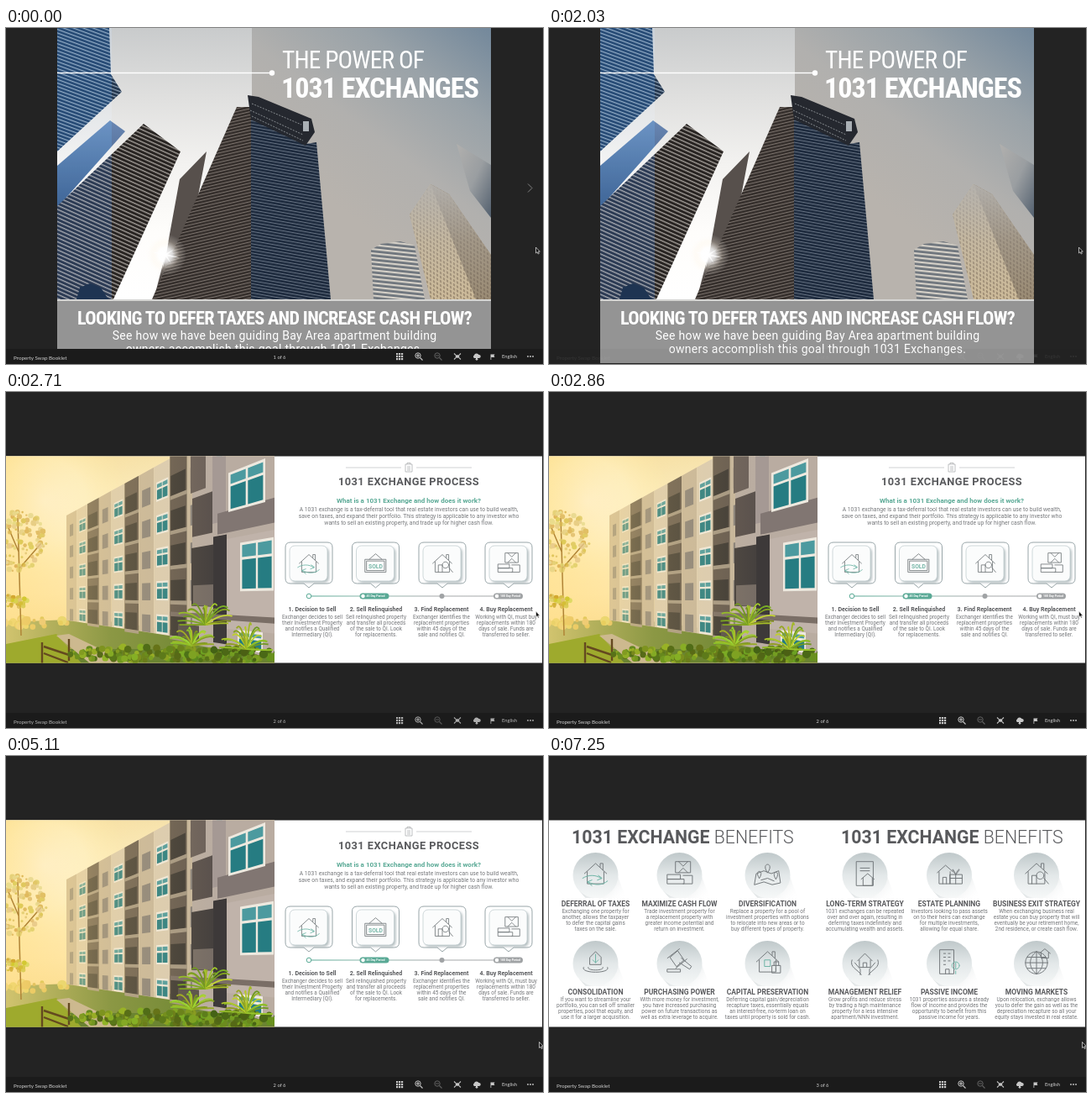
Recreate the animation shown at these times as an HTML page. Size 640 px wide and 400 px high, loop 8 s.

```html
<!DOCTYPE html>
<html lang="en">
<head>
<meta charset="utf-8">
<title>Brochure viewer</title>
<style>
html, body { margin: 0; width: 100%; height: 100%; overflow: hidden; background: #232323; }
svg { display: block; width: 100vw; height: 100vh; }
text { font-family: Roboto, sans-serif; }
.narrow { font-family: "Noto Sans ExtraCondensed", "Roboto Condensed", Roboto, sans-serif; font-stretch: 62.5%; letter-spacing: -.03em; }
.ui text { font-family: Lato, sans-serif; }
.line { fill: none; stroke: #74797c; stroke-width: .9; stroke-linejoin: round; stroke-linecap: round; }
.accent { stroke: #6fb5a6; }
</style>
</head>
<body>
<svg id="stage" viewBox="0 0 640 400"></svg>
<script>
const LOOP = 8000;
const INK = "#58595c", BODY = "#75777a", TEAL = "#59a995";
const stage = document.getElementById("stage");

let seed = 7;
const random = () => (seed = (seed * 16807) % 2147483647) / 2147483647;
const range = n => [...Array(n).keys()];

const text = (x, y, size, fill, content, more = "") =>
  `<text x="${x}" y="${y}" font-size="${size}" fill="${fill}" ${more}>${content}</text>`;
const middle = (x, y, size, fill, content, more = "") =>
  text(x, y, size, fill, content, `text-anchor="middle" ${more}`);
const lines = (x, y, step, size, fill, content) =>
  content.split("|").map((s, i) => middle(x, y + i * step, size, fill, s)).join("");
const rect = (x, y, w, h, fill, more = "") =>
  `<rect x="${x}" y="${y}" width="${w}" height="${h}" fill="${fill}" ${more}/>`;
const poly = (points, fill, more = "") => `<polygon points="${points}" fill="${fill}" ${more}/>`;
const circle = (x, y, r, fill, more = "") => `<circle cx="${x}" cy="${y}" r="${r}" fill="${fill}" ${more}/>`;
const path = (d, more = 'class="line"') => `<path d="${d}" ${more}/>`;
const at = (x, y, content) => `<g transform="translate(${x} ${y})">${content}</g>`;
const BOLD = 'font-weight="700"', LIGHT = 'font-weight="300"';

const stops = colors => colors.map((c, i) =>
  `<stop offset="${i / (colors.length - 1)}" stop-color="${c}"/>`).join("");
const linear = (id, direction, ...colors) =>
  `<linearGradient id="${id}" ${direction}>${stops(colors)}</linearGradient>`;
const vertical = (id, ...colors) => linear(id, 'x2="0" y2="1"', ...colors);
const horizontal = (id, ...colors) => linear(id, "", ...colors);
const radial = (id, ...colors) => `<radialGradient id="${id}">${stops(colors)}</radialGradient>`;
const stripes = (id, dark, light, period, thick, angle) =>
  `<pattern id="${id}" width="${period}" height="${period}" patternUnits="userSpaceOnUse"
    patternTransform="rotate(${angle})">${rect(0, 0, period, period, dark)}
    ${rect(0, 0, period, thick, light)}</pattern>`;

const defs = `<defs>
  ${vertical("sky", "#c9cbcc", "#dfdfde", "#f3f2f0", "#fefdfb", "#fff")}
  ${linear("dimSky", 'x1="1" y1="0" x2=".5" y2=".75"', "#73889b", "#99a2a8", "#b1b0ae", "#b8b3ad")}
  ${radial("sun", "#fff", "#fffc", "#fff5e640", "#fff0")}
  ${stripes("blueGlass", "#21344c", "#93a5b8", 4, 1.2, 20)}
  ${vertical("midGlass", "#6987b3", "#3a5379")}
  ${stripes("slabs", "#272321", "#a09b96", 4.4, 1.4, 24)}
  ${stripes("towerLeft", "#342e2b", "#7d746e", 3.6, 1, -13)}
  ${stripes("towerRight", "#1d2a3d", "#667282", 3.6, 1, 10)}
  ${stripes("roundTower", "#6d747c", "#d6d1c8", 5, 2.2, 6)}
  <pattern id="beige" width="4" height="5" patternUnits="userSpaceOnUse" patternTransform="skewY(30)">
    ${rect(0, 0, 4, 5, "#cdbb9a")}${rect(1, 1, 2, 3, "#98866d")}</pattern>
  ${vertical("mist", "#b3b1aeee", "#b3b1ae50", "#b3b1ae00")}
  ${linear("farTower", 'x2="1" y2="1"', "#b1b0ae", "#9a9ea1", "#525f6e")}
  ${vertical("sunset", "#f5e2ae", "#fff6d6", "#ffeab4", "#f6cf7c")}
  ${radial("glow", "#fff", "#fffae0cc", "#fff0b000")}
  ${horizontal("warmth", "#ffe08ab0", "#ffdd8838", "#ffdd8800")}
  ${vertical("disc", "#bfc8ca", "#e3e8e9", "#f6f8f8")}
  ${linear("shade", 'x2="1" y2="1"', "#bcc3c5", "#dfe3e4", "#ffffff00")}
  ${horizontal("track", TEAL, "#8fb8ad", "#a5a8aa", "#a5a8aa")}
  <clipPath id="cover"><rect x="61" width="517" height="323"/></clipPath>
  <clipPath id="photo"><rect y="76.5" width="320" height="246"/></clipPath>
  <filter id="soft"><feGaussianBlur stdDeviation="1.4"/></filter>
</defs>`;

function coverPage() {
  const rightTower = "481,222 506,186 528,198 578,270 578,323 506,323";
  const skyline = [
    poly("61,0 123,0 125,55 138,76 61,147", "url(#blueGlass)"),
    poly("61,164 124,110 142,123 61,214", "url(#midGlass)"),
    poly("61,212 164,114 208,147 128,323 61,323", "url(#slabs)"),
    poly("84,323 88,309 100,304 113,309 122,323", "#191c20"),
    poly("239,147 207,180 192,262 176,323 210,300", "#57504c"),
    poly("275,94 294,94 294,323 174,323", "url(#towerLeft)"),
    poly("292,94 357,138 370,136 387,323 292,323", "url(#towerRight)"),
    poly("288,80 301,82 364,108 368,124 357,140 292,109", "#25282f"),
    path("M293 90L352 115M291 98L354 127M293 105L354 134", 'stroke="#858a8e" stroke-width="1" fill="none" stroke-dasharray="2 1.5"'),
    rect(354, 111, 7, 12, "#aab0b5"),
    poly("537,138 578,163 578,226 553,194", "url(#farTower)"),
    poly("435,264 447,257 470,254 487,259 499,323 438,323", "url(#roundTower)"),
    poly(rightTower, "url(#beige)"),
    poly("506,186 528,198 578,270 578,323 560,323", "#5e5348", 'opacity=".45"'),
    poly(rightTower, "url(#mist)")
  ].join("");
  const rays = range(8).map(i =>
    `<path d="M-1.2 0L0 ${i % 2 ? 12 : 18}L1.2 0z" fill="#fff" opacity=".8" transform="rotate(${i * 45 + 12})"/>`).join("");
  return `<g clip-path="url(#cover)">
    ${rect(61, 0, 517, 323, "url(#sky)")}
    ${rect(293, 0, 285, 323, "url(#dimSky)")}
    ${skyline}
    ${rect(61, 0, 65, 323, "#06234c", 'style="mix-blend-mode:screen" opacity=".75"')}
    ${circle(190, 270, 25, "url(#sun)")}${at(190, 270, rays)}
    </g>
    ${rect(61, 323, 517, 76, "#949494")}${rect(61, 323, 517, 2, "#d5d5d3")}
    ${rect(61, 52.8, 256, 1.4, "#fff")}${circle(317, 53.5, 3.2, "#fff")}
    ${text(329, 47.5, 30, "#fff", "THE POWER OF", 'class="narrow" data-width="169"')}
    ${text(328, 82.5, 34, "#fff", "1031 EXCHANGES", `class="narrow" ${BOLD} data-width="235"`)}
    ${text(85, 352.5, 22, "#fff", "LOOKING TO DEFER TAXES AND INCREASE CASH FLOW?", `class="narrow" ${BOLD} data-width="470"`)}
    ${middle(320, 371, 14, "#fff", "See how we have been guiding Bay Area apartment building", 'letter-spacing=".3"')}
    ${middle(320, 387, 14, "#fff", "owners accomplish this goal through 1031 Exchanges.", 'letter-spacing=".3"')}`;
}

// Everything on the facade lies on lines through one vanishing point.
function facade(x1, x2, top, bottom, fill) {
  const y = (x, slope) => (245 + slope * (x + 106)).toFixed(1);
  return poly(`${x1},${y(x1, top)} ${x2},${y(x2, top)} ${x2},${y(x2, bottom)} ${x1},${y(x1, bottom)}`, fill);
}
function pane(x1, x2, top, bottom) {
  const mid = (x1 + x2) / 2, gap = (x2 - x1) * .06, bar = (bottom - top) * .3;
  return facade(x1, x2, top, bottom, "#eee9df")
    + [[x1 + gap, mid - gap / 2], [mid + gap / 2, x2 - gap]].map(([a, b]) =>
      facade(a, b, top + .008, top + bar, "#4c9a9f") + facade(a, b, top + bar + .008, bottom - .008, "#267c82")).join("");
}
function foliage(count, x, y, w, h, r, hue, light) {
  return range(count).map(() => {
    const a = random() * 6.283, d = Math.sqrt(random());
    return circle((x + Math.cos(a) * d * w).toFixed(1), (y + Math.sin(a) * d * h).toFixed(1),
      (r * (.5 + random())).toFixed(1), `hsl(${hue + random() * 14} 65% ${light + random() * 18}%)`);
  }).join("");
}
function palm(x, y, size) {
  return range(17).map(i => {
    const a = Math.PI * (1.02 + i / 16 * .96) + (random() - .5) * .3;
    const reach = size * (.7 + random() * .5), dx = Math.cos(a) * reach, dy = Math.sin(a) * reach;
    return path(`M${x} ${y}Q${x + dx * .6} ${y + dy} ${x + dx} ${y + dy * .7}`,
      `fill="none" stroke="hsl(${65 + random() * 18} 65% ${32 + random() * 20}%)" stroke-width="1.8"`);
  }).join("");
}
function apartmentPhoto() {
  const edge = i => 178 * 1.068 ** i - 106;
  const columns = range(11).map(i => {
    const a = edge(i), b = edge(i + 1), dark = i % 3 == 2;
    const panel = facade(a, b, i > 7 ? -.66 : -.55, .15, dark ? "#655a50" : i % 3 ? "#d9cbb3" : "#c5b59c");
    return panel + range(5).map(k => {
      const top = -.5 + k * .137;
      if (dark) return facade(a + 1, b - 2, top + .02, top + .1, "#3d3935") + facade(a, b, top + .1, top + .115, "#a39683");
      return i % 3 == 1 ? pane(a + 3, b - 2, top + .02, top + .1) : facade(a + 4, b - 4, top + .025, top + .1, "#87807a");
    }).join("");
  }).join("");
  const block = [
    facade(222, 320, -.75, .17, "#b9aca1"),
    facade(220, 238, -.55, -.38, "#6b605a"), facade(222, 246, -.36, -.22, "#5a514d"),
    facade(221, 250, -.18, .03, "#45403e"), facade(223, 248, -.045, .028, "#766c65"),
    facade(246, 262, -.64, -.25, "#a59994"), facade(252, 320, -.28, -.21, "#817672"),
    facade(247, 263, -.205, .15, "#3d3939"), facade(263, 320, -.19, .1, "#c0b3aa"),
    pane(265, 309, -.4, -.275), pane(279, 319, -.17, -.02),
    facade(195, 320, .055, .072, "#7a6e66"),
    facade(205, 230, .1, .155, "#57504a"), pane(276, 306, .1, .16)
  ].join("");
  return `<g clip-path="url(#photo)">
    ${rect(0, 76, 320, 247, "url(#sunset)")}${circle(45, 130, 100, "url(#glow)")}
    ${poly("0,274 100,270 320,300 320,323 0,323", "#6b8431")}
    ${foliage(24, 32, 275, 42, 6, 4, 42, 45)}
    ${columns}${block}
    ${rect(0, 76, 250, 230, "url(#warmth)")}
    ${path("M18 290L14 150M16 210L42 180M15 190L3 162", 'stroke="#b08436" stroke-width="1.5" fill="none"')}
    <g opacity=".8">${foliage(130, 16, 178, 32, 36, 2.3, 40, 55)}</g>
    ${foliage(40, 10, 250, 16, 9, 2.3, 44, 50)}
    ${poly("0,300 60,288 90,323 0,323", "#9eaa2d")}
    ${poly("60,290 75,288 148,323 100,323", "#cdb98f")}
    ${path("M43 298V323M75 294V320M45 303L78 314M45 311L74 322", 'stroke="#64491f" stroke-width="2.4" fill="none"')}
    ${foliage(150, 168, 312, 95, 9, 3, 68, 25)}
    ${foliage(90, 270, 313, 55, 9, 3.5, 72, 22)}
    ${palm(238, 277, 33)}${palm(287, 306, 34)}${palm(222, 302, 25)}
  </g>`;
}

const HOUSE = "M-12 0L0-11 12 0M-9-2V11H9V-2M5-7V-11H8V-4";
const ICONS = {
  swap: [HOUSE, "M-14 5C-8 1 0 1 6 5M3 2L7 5 2 7M13 8C7 13-1 13-8 9M-4 7L-9 9-4 13"],
  sold: ["M-13-5H13V11H-13zM-11-3H11V9H-11zM-8-5L0-12 8-5"],
  search: [HOUSE + "M-5 11V2H0V11M8 5L13 11M8 2A4 4 0 1 0 8 2.1"],
  cash: ["M-4-13H12V-1H-4zM-1-13L4-8 9-13M-1-1L4-6 9-1M-13 1H1V6H-13zM-13 6H5V11H-13zM4 2H14V11H4"],
  pins: ["M-12 0L-4-3 4 0 12-3 14 10 5 12-4 9-14 12zM0-1C-9-13 9-13 0-1M-9 5C-16-5-2-5-9 5M9 6C2-4 16-4 9 6M-7 7L0 5 7 8"],
  contract: ["M-9-13H9V13H-9zM-5-6H5M-5-3H5M-4 6L3 0 10 6M-2 5V13H8V5"],
  gift: ["M-13-1L-4-9 4-2M-11-2V11H1V-2M1 1H14V11H1zM7 1V11M1 5H14M7 1C1-6 4-7 7 1C10-7 14-6 7 1M-7 11V4H-3V11"],
  drop: ["M-6-5L0-11 6-5V3H-6zM-13 6C-17 13 17 13 13 6M-8 6C-10 10 10 10 8 6", "M0-8V1M-3-2L0 1 3-2"],
  gavel: ["M-10-5L-2-12 5-2-3 5zM2-4L13 5 11 8 0 1M-13-4L0-14M-4 7L8-3M-13 8H1V11H-13z"],
  lock: [HOUSE + "M5 4H14V12H5zM7 4V0H12V4M9 7V9", "M-3-2H3V5H-3z"],
  hands: ["M-8-1L0-9 8-1M-6-2V6H6V-2M-2 6V1H2V6M-14-2C-17 6-8 8-4 14M14-2C17 6 8 8 4 14M-11 1L-5 8V14M11 1L5 8V14"],
  tower: ["M-10-13H5V13H-10zM-6-9H-4M-1-9H1M-6-5H-4M-1-5H1M-6-1H-4M-1-1H1M-6 3H-4M-4 13V8H0V13", "M11 4A4 4 0 1 0 11 4.1M7 1V7M7 10V13"],
  globe: ["M12 1A12 12 0 1 0 12 1.1M-12 1H12M0-11V13M0-11C-9-5-9 7 0 13M0-11C9-5 9 7 0 13M-10-5H10M-10 7H10M3-9L9-14 15-9M5-10V-4H13V-10"]
};
const icon = (x, y, name, scale = 1) => {
  const [main, accent] = ICONS[name];
  return `<g transform="translate(${x} ${y}) scale(${scale})">${path(main)}${accent ? path(accent, 'class="line accent"') : ""}</g>`;
};

const STEPS = [
  [361, 365, "swap", "1. Decision to Sell", "Exchanger decides to sell|their Investment Property|and notifies a Qualified|Intermediary (QI)."],
  [440.5, 441, "sold", "2. Sell Relinquished", "Sell relinquished property|and transfer all proceeds|of the sale to QI. Look|for replacements."],
  [520, 519, "search", "3. Find Replacement", "Exchanger identifies the|replacement properties|within 45 days of the|sale and notifies QI."],
  [599, 596, "cash", "4. Buy Replacement", "Working with QI, must buy|replacements within 180|days of sale. Funds are|transferred to seller."]
];
function stepCard([x, textX, name, title, body]) {
  return at(x, 204, `
    ${path("M-22-25H22Q28-25 28-19V18Q28 24 22 24H6L0 29-6 24H-22Q-28 24-28 18V-19Q-28-25-22-25z", 'fill="#fff" stroke="#98a5a8" stroke-width="1"')}
    ${rect(-21, -19, 45, 42, "#89999c", 'rx="6" filter="url(#soft)" opacity=".65"')}
    ${rect(-23, -21, 45, 42, "#fbfcfc", 'rx="6" stroke="#c5d0d2" stroke-width=".8"')}`)
    + icon(x, 204, name, .95)
    + (name == "sold" ? middle(x, 210, 6.8, "#79b8a9", "SOLD", BOLD) : "")
    + middle(textX, 260.5, 7.05, INK, title, BOLD)
    + lines(textX, 270, 7.15, 6.4, BODY, body);
}
const pill = (x, label, color) => rect(x, 239.5, 35, 7, color, 'rx="3.5"')
  + circle(x + 4, 243, 2.8, "#fff", `stroke="${color}" stroke-width="1"`)
  + text(x + 8, 244.4, 3.5, "#fff", label, BOLD);

function processPage() {
  return rect(0, 76.5, 639, 246, "#fff") + apartmentPhoto()
    + path("M405 90H471M489 90H555", 'stroke="#c4c6c8" stroke-width=".8"')
    + path("M476 86H484V95H476zM478 86V84.5H482V86M478 89H482M478 91H482M478 93H482", 'fill="none" stroke="#a5a8aa" stroke-width=".7"')
    + middle(480, 110.5, 12.8, INK, "1031 EXCHANGE PROCESS", `${BOLD} letter-spacing=".45"`)
    + middle(480, 132, 8, TEAL, "What is a 1031 Exchange and how does it work?", BOLD)
    + lines(480, 142, 8.2, 6.75, BODY, "A 1031 exchange is a tax-deferral tool that real estate investors can use to build wealth,|save on taxes, and expand their portfolio. This strategy is applicable to any investor who|wants to sell an existing property, and trade up for higher cash flow.")
    + STEPS.map(stepCard).join("")
    + rect(361, 242.5, 225, 1, "url(#track)")
    + circle(361, 243, 2.8, "#fff", `stroke="${TEAL}" stroke-width="1"`)
    + circle(519.5, 243, 3, "#a0a3a5")
    + pill(421.5, "45 Day Period", TEAL) + pill(581, "180 Day Period", "#a0a3a5");
}

const BENEFITS = [
  ["swap", "DEFERRAL OF TAXES", "Exchanging one property for|another, allows the taxpayer|to defer the capital gains|taxes on the sale."],
  ["cash", "MAXIMIZE CASH FLOW", "Trade investment property for|a replacement property with|greater income potential and|return on investment."],
  ["pins", "DIVERSIFICATION", "Replace a property for a pool of|investment properties with options|to relocate into new areas or to|buy different types of property."],
  ["contract", "LONG-TERM STRATEGY", "1031 exchanges can be repeated|over and over again, resulting in|deferring taxes indefinitely and|accumulating wealth and assets."],
  ["gift", "ESTATE PLANNING", "Investors looking to pass assets|on to their heirs can exchange|for multiple investments,|allowing for equal share."],
  ["search", "BUSINESS EXIT STRATEGY", "When exchanging business real|estate you can buy property that will|eventually be your retirement home,|2nd residence, or create cash flow."],
  ["drop", "CONSOLIDATION", "If you want to streamline your|portfolio, you can sell off smaller|properties, pool that equity, and|use it for a larger acquisition."],
  ["gavel", "PURCHASING POWER", "With more money for investment,|you have increased purchasing|power on future transactions as|well as extra leverage to acquire."],
  ["lock", "CAPITAL PRESERVATION", "Deferring capital gain/depreciation|recapture taxes, essentially equals|an interest-free, no-term loan on|taxes until property is sold for cash."],
  ["hands", "MANAGEMENT RELIEF", "Grow profits and reduce stress|by trading a high maintenance|property for a less intensive|apartment/NNN investment."],
  ["tower", "PASSIVE INCOME", "1031 properties assures a steady|flow of income and provides the|opportunity to benefit from this|passive income for years."],
  ["globe", "MOVING MARKETS", "Upon relocation, exchange allows|you to defer the gain as well as the|depreciation recapture so all your|equity stays invested in real estate."]
];
const COLUMNS = [55.5, 155.5, 260.5, 376.5, 477, 581];
function benefitsPage() {
  const heading = x => text(x, 104, 21.3, INK, `<tspan ${BOLD}>1031 EXCHANGE</tspan> <tspan ${LIGHT}>BENEFITS</tspan>`);
  const cells = BENEFITS.map(([name, title, body], i) => {
    const x = COLUMNS[i % 6], y = i < 6 ? 142 : 247;
    return at(x, y, path("M-19 19L-12 27H36L19-19z", 'fill="url(#shade)"') + circle(0, 0, 27, "url(#disc)"))
      + icon(x, y - 2, name, 1.1)
      + middle(x, y + 36.5, 8.5, INK, title, BOLD)
      + lines(x, y + 45, 6.95, 6.42, BODY, body);
  }).join("");
  return rect(0, 76.5, 639, 246, "#fff") + heading(27) + heading(348) + cells;
}

function toolbar() {
  const stroke = 'fill="none" stroke="#c8c8c8" stroke-width="1.1"';
  const lens = sign => circle(-1, -1, 3.2, "none", 'stroke="#c8c8c8" stroke-width="1"') + path("M1.5 1.5L4.5 4.5" + sign, stroke);
  const grid = range(9).map(i => rect(-4 + i % 3 * 3, -4 + Math.floor(i / 3) * 3, 2.2, 2.2, "#c8c8c8")).join("");
  return text(9, 394.5, 6.3, "#d0d0d0", "Property Swap Booklet")
    + middle(326, 394.2, 5.8, "#d0d0d0", "1 of 6", 'id="counter"')
    + at(469, 391, grid) + at(492, 391, lens("M-3-1H1M-1-3V1"))
    + `<g opacity=".4">${at(515, 391, lens("M-3-1H1"))}</g>`
    + at(538, 391, rect(-2.2, -1.7, 4.4, 3.4, "#c8c8c8") + path("M-4-3.5L-2-1.7M4-3.5L2-1.7M-4 3.5L-2 1.7M4 3.5L2 1.7", stroke))
    + at(561, 391, path("M-3 2A2 2 0 0 1-3-1.5A3 3 0 0 1 2.5-2A2 2 0 0 1 3 2zM-1 1H1V3H2L0 5-2 3H-1z", 'fill="#c8c8c8"'))
    + at(580, 391, path("M-2.5 4V-2.5H2.5L1.5-.7 2.5 1H-1.7V4z", 'fill="#c8c8c8"'))
    + middle(600, 393, 5.8, "#d0d0d0", "English")
    + [-3, 0, 3].map(dx => circle(625 + dx, 391, .9, "#c8c8c8")).join("");
}
const chevron = (id, d) => path(d, `id="${id}" fill="none" stroke="#999" stroke-width="1"`);

stage.innerHTML = defs
  + `<g id="page1">${coverPage()}</g><g id="page2">${processPage()}</g><g id="page3">${benefitsPage()}</g>`
  + rect(0, 382, 640, 18, "#1b1b1b", 'id="bar"')
  + `<g id="tools" class="ui">${toolbar()}</g>`
  + chevron("prev", "M18 185.5L13 190.5 18 195.5") + chevron("next", "M622 185.5L627 190.5 622 195.5")
  + path("M0 0V7L1.6 5.6 2.7 8 3.8 7.5 2.8 5.2H4.8z", 'id="cursor" fill="#111" stroke="#e8e8e8" stroke-width=".7"');

// Headline sizes adapt to whichever condensed face is available.
for (const el of stage.querySelectorAll(".narrow")) {
  const size = +el.getAttribute("font-size");
  el.setAttribute("font-size", size * el.dataset.width / el.getComputedTextLength());
}

const part = id => document.getElementById(id);
const step = (t, keys) => keys.findLast(([start]) => t >= start)[1];
const PAGE = [[0, 1], [2570, 0], [2710, 2], [7120, 0], [7250, 3]];
const TOOLS = [[0, 1], [1650, .6], [1890, .12], [2030, .1], [2570, .35], [2710, .85], [2860, 1]];
const BAR = [[0, 1], [1890, .25], [2030, .03], [2570, .35], [2710, .9], [2860, 1]];
const PREV = [[0, 0], [2570, .35], [2710, 0], [7120, .8], [7250, 0]];
const NEXT = [[0, .8], [1650, .4], [1890, 0], ...PREV.slice(1)];
const CURSOR = [[0, "631.5 261"], [4680, "631 261"], [4880, "635.5 337"], [5110, "635.5 340.5"]];

function draw() {
  const t = performance.now() % LOOP;
  const page = step(t, PAGE);
  for (const n of [1, 2, 3]) part("page" + n).style.display = n == page ? "" : "none";
  for (const [id, keys] of [["tools", TOOLS], ["bar", BAR], ["prev", PREV], ["next", NEXT]])
    part(id).setAttribute("opacity", step(t, keys));
  part("counter").textContent = `${t < 2570 ? 1 : t < 7120 ? 2 : 3} of 6`;
  part("cursor").setAttribute("transform", `translate(${step(t, CURSOR)})`);
  requestAnimationFrame(draw);
}
draw();
</script>
</body>
</html>
```
